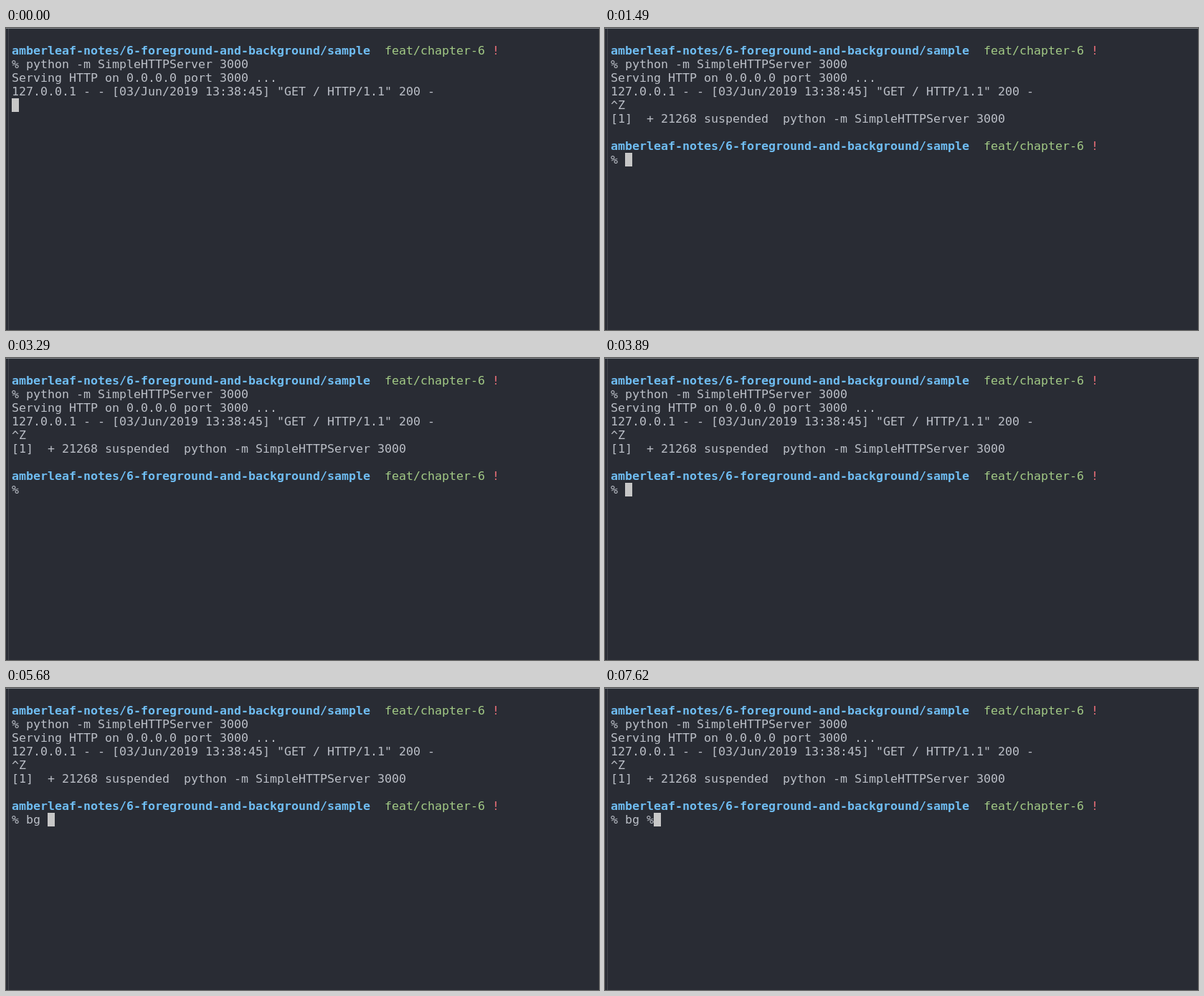
Animation, 827 px wide and 421 px high, one loop 8 s. Source, as an HTML page:

```html
<!DOCTYPE html>
<html lang="en">
<head>
<meta charset="utf-8">
<title>Terminal</title>
<style>
  html, body { margin: 0; width: 100%; height: 100%; overflow: hidden; background: #292c34; }
  .terminal {
    position: relative; width: 827px; height: 421px; overflow: hidden;
    background: #292c34; color: #bbbfc7;
    font: 16.61px/19px "DejaVu Sans Mono", monospace;
  }
  .terminal::before, .terminal::after { content: ""; position: absolute; }
  .terminal::before { left: 0; top: 0; width: 100%; height: 1px; background: #85888b; }
  .terminal::after { left: 3px; top: 1px; width: 1px; bottom: 0; background: #43464d; }
  pre, .typed, .cursor { position: absolute; left: 8px; margin: 0; font: inherit; white-space: pre; }
  pre { top: 22px; }
  b { color: #6fbdf2; }
  i { color: #a2c985; font-style: normal; }
  em { color: #e96f79; font-style: normal; }

  .output, .typed, .cursor { animation: 8s step-end infinite; }
  .output { top: 98px; animation-name: show; }
  .typed { left: 28px; top: 174px; animation-name: type; }
  .cursor { top: 98px; width: 10px; height: 19px; background: #c7c7c7; animation-name: blink, move; }

  @keyframes show {
    0% { opacity: 0; }
    18.625%, 100% { opacity: 1; }
  }
  @keyframes type {
    0% { clip-path: inset(0 100% 0 0); }
    63.5% { clip-path: inset(0 75% 0 0); }
    65.375% { clip-path: inset(0 50% 0 0); }
    95.25%, 100% { clip-path: inset(0); }
  }
  @keyframes blink {
    0%, 9.25%, 18.625%, 35.5%, 48.625%, 61.625%, 85.875%, 95.25%, 100% { opacity: 1; }
    3.625%, 16.75%, 29.875%, 41.125%, 54.125%, 80.375%, 93.375% { opacity: 0; }
  }
  @keyframes move {
    0% { transform: none; }
    18.625% { transform: translate(20px, 76px); }
    63.5% { transform: translate(30px, 76px); }
    65.375% { transform: translate(40px, 76px); }
    71% { transform: translate(50px, 76px); }
    95.25%, 100% { transform: translate(60px, 76px); }
  }
</style>
</head>
<body>
<div class="terminal">
<pre><b>amberleaf-notes/6-foreground-and-background/sample</b>  <i>feat/chapter-6</i> <em>!</em>
% python -m SimpleHTTPServer 3000
Serving HTTP on 0.0.0.0 port 3000 ...
127.0.0.1 - - [03/Jun/2019 13:38:45] "GET / HTTP/1.1" 200 -</pre>
<pre class="output">^Z
[1]  + 21268 suspended  python -m SimpleHTTPServer 3000

<b>amberleaf-notes/6-foreground-and-background/sample</b>  <i>feat/chapter-6</i> <em>!</em>
%</pre>
<span class="typed">bg %</span>
<span class="cursor"></span>
</div>
</body>
</html>
```
